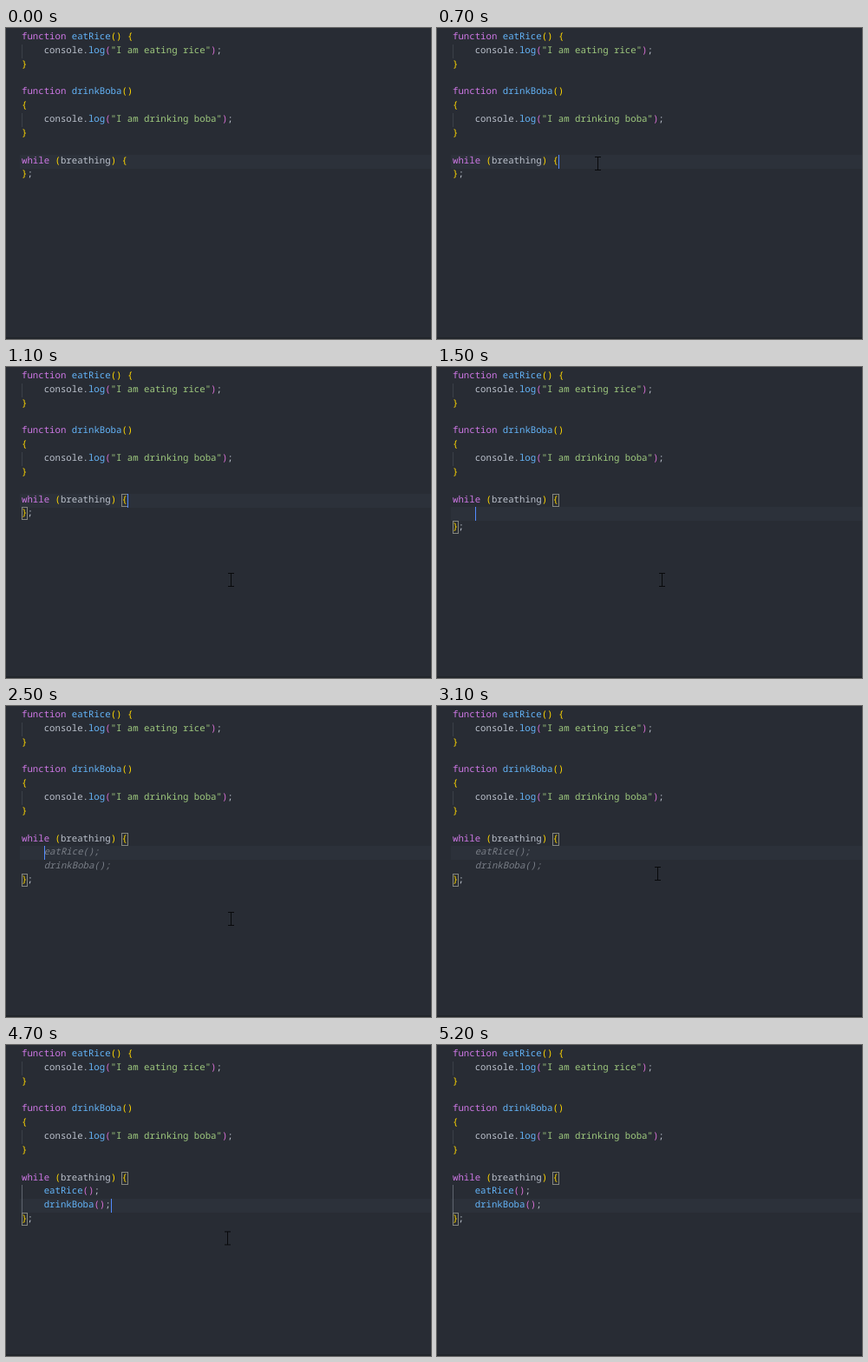
These frames come from a looping animation (490x358 px, 5.5 s). An HTML page:

```html
<!DOCTYPE html>
<html lang="en">
<head>
<meta charset="utf-8">
<title>Code editor</title>
<style>
  html, body { margin: 0; width: 100%; height: 100%; overflow: hidden; background: #282c34; }
  .stage {
    position: relative; width: 490px; height: 358px; overflow: hidden;
    background: #282c34; color: #bcc2cd;
    font: 500 10.7px/16px "Noto Sans Mono", "DejaVu Sans Mono", monospace;
    text-rendering: geometricPrecision; white-space: pre;
  }
  .stage > * { position: absolute; animation: 5.5s step-end infinite; }
  .line { left: 18px; top: var(--y); }
  .key { color: #cf78e6; }
  .fn { color: #64b5fa; }
  .str { color: #a0cb7f; }
  .b1 { color: #ffd700; }
  .b2 { color: #da70d6; }
  .ghost { color: #797e87; font-style: italic; }

  .band { left: 16px; top: 1px; width: 474px; height: 16px; background: #2c313a; animation-name: band; }
  .guide { left: 18px; top: var(--y); width: 1px; height: 16px; background: #3b4048; }
  .guide.active { height: 32px; background: #5f656f; }
  .foot { left: 0; top: 356px; width: 490px; height: 2px; background: #21252b; }

  .pair { position: relative; }
  .pair::after {
    content: ""; position: absolute; left: 0; right: -1px; top: 0; height: 15px;
    box-sizing: border-box; border: 1px solid #85877f;
    animation: match 5.5s step-end infinite;
  }
  .close { top: 0; animation-name: close; }
  .stage > .ghost { animation-name: ghost; }
  .stage > .done { animation-name: done; }
  .caret { left: 0; top: 1px; width: 1px; height: 16px; background: #528bff; }
  .stage > .caret { animation-name: caret, blink; }
  .mouse { left: -4px; top: -8px; width: 8px; height: 16px; }
  .stage > .mouse { animation-name: mouse, show; }

  @keyframes band {
    0% { transform: translateY(145px); }
    23.63% { transform: translateY(160px); }
    67.27%, 100% { transform: translateY(176px); }
  }
  @keyframes close {
    0% { transform: translateY(160px); }
    23.63% { transform: translateY(176px); }
    29.09%, 100% { transform: translateY(192px); }
  }
  @keyframes match { 0% { opacity: 0; } 14.54%, 100% { opacity: 1; } }
  @keyframes ghost { 0% { opacity: 0; } 29.09% { opacity: 1; } 67.27%, 100% { opacity: 0; } }
  @keyframes done { 0% { opacity: 0; } 67.27%, 100% { opacity: 1; } }
  @keyframes caret {
    0% { transform: translate(140px, 145px); }
    23.63% { transform: translate(44px, 160px); }
    67.27%, 100% { transform: translate(121px, 176px); }
  }
  @keyframes blink {
    0%, 21.81%, 34.54%, 52.72%, 76.36%, 94.54%, 100% { opacity: 0; }
    12.72%, 23.63%, 45.45%, 61.81%, 85.45% { opacity: 1; }
  }
  @keyframes show { 0% { opacity: 0; } 1.81% { opacity: 1; } 94.54%, 100% { opacity: 0; } }
  /* the pointer moves in 100 ms ticks */
  @keyframes mouse {
    0% { transform: translate(416px, 308px); }
    1.81% { transform: translate(416px, 308px); animation-timing-function: steps(5); }
    10.9% { transform: translate(185px, 156px); }
    12.72% { transform: translate(185px, 156px); animation-timing-function: steps(4); }
    19.99% { transform: translate(259px, 245px); }
    50.9% { transform: translate(259px, 245px); animation-timing-function: steps(3); }
    56.36% { transform: translate(254px, 193px); }
    83.63% { transform: translate(254px, 193px); animation-timing-function: steps(5); }
    92.72%, 100% { transform: translate(259px, 340px); }
  }
</style>
</head>
<body>
<div class="stage">
  <div class="band"></div>
  <div class="guide" style="--y:19px"></div>
  <div class="guide" style="--y:98px"></div>
  <div class="guide active done" style="--y:161px"></div>

  <div class="line" style="--y:2px"><span class="key">function</span> <span class="fn">eatRice</span><span class="b1">()</span> <span class="b1">{</span></div>
  <div class="line" style="--y:18px">    console.<span class="fn">log</span><span class="b2">(</span><span class="str">"I am eating rice"</span><span class="b2">)</span>;</div>
  <div class="line b1" style="--y:34px">}</div>

  <div class="line" style="--y:65px"><span class="key">function</span> <span class="fn">drinkBoba</span><span class="b1">()</span></div>
  <div class="line b1" style="--y:81px">{</div>
  <div class="line" style="--y:97px">    console.<span class="fn">log</span><span class="b2">(</span><span class="str">"I am drinking boba"</span><span class="b2">)</span>;</div>
  <div class="line b1" style="--y:113px">}</div>

  <div class="line" style="--y:145px"><span class="key">while</span> <span class="b1">(</span>breathing<span class="b1">)</span> <span class="b1 pair">{</span></div>
  <div class="line ghost" style="--y:160px">    eatRice();</div>
  <div class="line ghost" style="--y:176px">    drinkBoba();</div>
  <div class="line done" style="--y:160px">    <span class="fn">eatRice</span><span class="b2">()</span>;</div>
  <div class="line done" style="--y:176px">    <span class="fn">drinkBoba</span><span class="b2">()</span>;</div>
  <div class="line close"><span class="b1 pair">}</span>;</div>

  <div class="caret"></div>
  <svg class="mouse" viewBox="0 0 8 16" fill="none" stroke="#08090b"><path d="M1 .5H8M4.5 1V15M1 15.5H8"/></svg>
  <div class="foot"></div>
</div>
</body>
</html>
```
